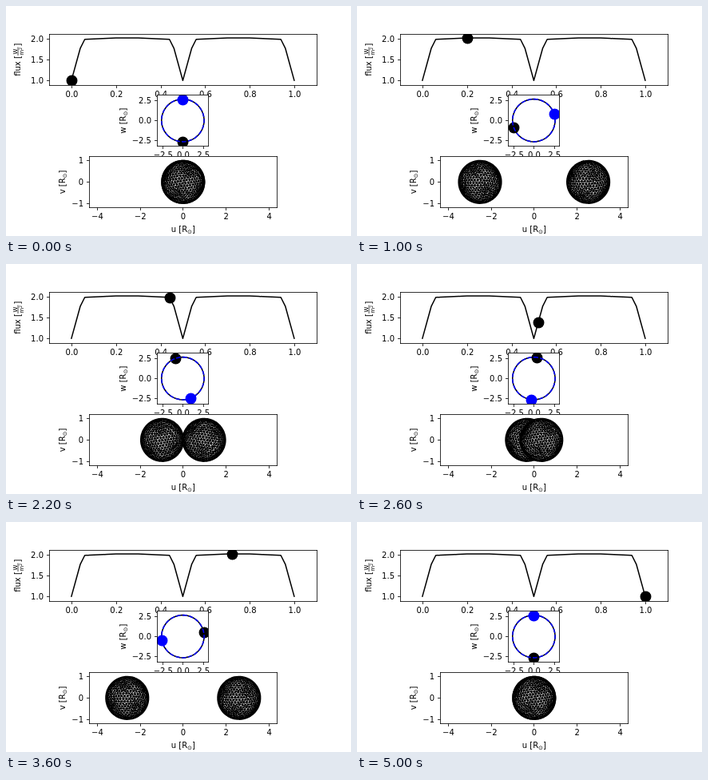
Animation, 432 px wide and 288 px high, one loop 5100 ms. Source, as an HTML page:

```html
<!DOCTYPE html>
<html lang="en">
<head>
<meta charset="utf-8">
<title>Binary star light curve</title>
<style>
  html, body { margin: 0; width: 100%; height: 100%; overflow: hidden; background: #fff; }
  svg { display: block; }
  text { font: 10px "DejaVu Sans", sans-serif; fill: #000; white-space: pre; }
  .s { font-size: 7px; }
  .ss { font-size: 4.9px; }
</style>
</head>
<body>
<svg id="stage" width="432" height="288" viewBox="0 0 432 288"></svg>
<script>
const stage = document.getElementById('stage');
const TAU = Math.PI * 2;
const STEPS = 50, STEP_MS = 100;
const CX = 221.4;
const ORBIT = 2.65;

function add(tag, attrs, parent = stage) {
  const el = document.createElementNS('http://www.w3.org/2000/svg', tag);
  for (const k in attrs) el.setAttribute(k, attrs[k]);
  parent.appendChild(el);
  return el;
}
function label(text, x, y, anchor) {
  add('text', { x, y, 'text-anchor': anchor }).textContent = text;
}
const snap = v => Math.floor(v + 0.5) + 0.5;
const toPath = pts => 'M' + pts.map(p => p[0].toFixed(2) + ' ' + p[1].toFixed(2)).join('L');

// Axes: white background, tick labels, a clipped layer for data, then the frame.
function axes(id, box, xt, yt, px, py, base) {
  const [x0, y0, x1, y1] = box;
  const r = Math.round;
  add('rect', { x: x0, y: y0, width: x1 - x0, height: y1 - y0, fill: '#fff' });
  const clip = add('clipPath', { id });
  add('rect', { x: r(x0), y: r(y0), width: r(x1) - r(x0), height: r(y1) - r(y0) }, clip);
  const [left, top, right, bottom] = box.map(snap);
  let marks = '';
  for (const [v, s] of xt) {
    marks += `M${snap(px(v))} ${bottom}v3.5`;
    label(s, px(v) + 0.6, base, 'middle');
  }
  for (const [v, s] of yt) {
    marks += `M${left} ${snap(py(v))}h-3.5`;
    label(s, r(x0 - 7), r(py(v) + 3.7), 'end');
  }
  const layer = add('g', { 'clip-path': `url(#${id})` });
  const ink = { fill: 'none', stroke: '#000', 'stroke-width': 0.8 };
  add('path', { d: marks, ...ink });
  for (const d of [`M${left} ${top}V${bottom}M${right} ${top}V${bottom}`,
                   `M${left} ${top}H${right}M${left} ${bottom}H${right}`])
    add('path', { d, ...ink, 'stroke-linecap': 'square' });
  return layer;
}
const ticks = (vals, digits) =>
  vals.map(v => [v, (v < 0 ? '\u2212' : '') + Math.abs(v).toFixed(digits)]);

// Light curve
const fluxX = p => 81.9 + 279 * p;
const fluxY = f => 93.18 - 51.74 * (f - 1);
function flux(i) {
  const k = i % 25, edge = Math.min(k, 25 - k);
  if (edge < 3) return [1, 1.39, 1.78][edge];
  return 2.03 - 0.042 * Math.cos(TAU * i / STEPS) ** 2;
}
// Orbit seen from above, and the sky plane
const orbX = u => CX + 10.06 * u;
const orbY = w => 143.27 - 10.06 * w;
const skyX = u => CX + 26.9 * u;
const skyY = v => 220.02 - 26.9 * v;
const place = a => [-ORBIT * Math.sin(a), -ORBIT * Math.cos(a)];

const top1 = axes('c1', [54, 34.56, 388.8, 98.51],
  ticks([0, 0.2, 0.4, 0.6, 0.8, 1], 1), ticks([1, 1.5, 2], 1), fluxX, fluxY, 114);
const mid = axes('c2', [189.42, 111.3, 253.38, 175.25],
  ticks([-2.5, 0, 2.5], 1), ticks([-2.5, 0, 2.5], 1), orbX, orbY, 190);
const sky = axes('c3', [103.9, 188.05, 338.9, 252],
  ticks([-4, -2, 0, 2, 4], 0), ticks([-1, 0, 1], 0), skyX, skyY, 267);

// Axis labels
function radiusLabel(name, x, y, turn) {
  const t = add('text', { transform: `translate(${x} ${y}) rotate(${turn})`, 'text-anchor': 'middle' });
  t.innerHTML = `${name} [R<tspan class="s" dy="1.6">\u2299</tspan><tspan dy="-1.6">]</tspan>`;
}
radiusLabel('u', 221.8, 283, 0);
radiusLabel('w', 150, 143.7, -90);
radiusLabel('v', 74, 220.5, -90);

const unit = add('g', { transform: 'translate(18 67) rotate(-90)' });
function unitText(s, x, y, cls = '') {
  add('text', { x, y, class: cls }, unit).textContent = s;
}
unitText('flux [', -20.8, 0);
unitText('W', 6.6, -4.4, 's');
unitText('m', 5.3, 4.2, 's');
unitText('2', 12.1, 2, 'ss');
unitText(']', 16.4, 0);
add('path', { d: 'M5 -3H15.6', stroke: '#000', 'stroke-width': 0.7 }, unit);

// Curves and markers
const idx = Array.from({ length: STEPS + 1 }, (_, i) => i);
const line = (pts, stroke, parent, more) => add('path', {
  d: toPath(pts), fill: 'none', stroke, 'stroke-width': 1.5, 'stroke-linejoin': 'round', ...more
}, parent);
const ball = (fill, parent) => add('circle', { r: 6.95, fill }, parent);
const ring = sign => idx.map(i => {
  const [u, w] = place(TAU * i / STEPS);
  return [orbX(sign * u), orbY(sign * w)];
});
line(idx.map(i => [fluxX(i / STEPS), fluxY(flux(i))]), '#000', top1, { 'stroke-linecap': 'square' });
const fluxBall = ball('#000', top1);
line(ring(1), '#000', mid);
const ballA = ball('#000', mid);
line(ring(-1), '#00f', mid, { 'stroke-dasharray': '5.55 2.4' });
const ballB = ball('#00f', mid);

function move(el, x, y) {
  el.setAttribute('cx', snap(x));
  el.setAttribute('cy', snap(y));
}

// Geodesic triangle mesh of a unit sphere, slightly uneven
function sphereMesh(n) {
  const g = (1 + Math.sqrt(5)) / 2, verts = [], tris = [];
  for (const a of [-1, 1]) for (const b of [-g, g]) verts.push([0, a, b], [a, b, 0], [b, 0, a]);
  const near = (p, q) => Math.abs(Math.hypot(p[0] - q[0], p[1] - q[1], p[2] - q[2]) - 2) < 0.01;
  const unitVec = p => { const l = Math.hypot(...p); return p.map(c => c / l); };
  const bend = p => {
    const [x, y, z] = unitVec(p);
    const q = unitVec([
      x + 0.016 * Math.sin(31 * y + 17 * z),
      y + 0.016 * Math.sin(29 * z + 19 * x),
      z + 0.016 * Math.sin(37 * x + 13 * y)]);
    const c = Math.cos(0.4), s = Math.sin(0.4);
    return [q[0] * c - q[1] * s, q[0] * s + q[1] * c, q[2]];
  };
  for (let i = 0; i < 12; i++) for (let j = i + 1; j < 12; j++) for (let k = j + 1; k < 12; k++) {
    const [A, B, C] = [verts[i], verts[j], verts[k]];
    if (!near(A, B) || !near(B, C) || !near(A, C)) continue;
    const at = (r, s) => bend(A.map((a, m) => a * (n - r - s) + B[m] * r + C[m] * s));
    for (let r = 0; r < n; r++) for (let s = 0; r + s < n; s++) {
      tris.push([at(r, s), at(r + 1, s), at(r, s + 1)]);
      if (r + s < n - 1) tris.push([at(r + 1, s), at(r + 1, s + 1), at(r, s + 1)]);
    }
  }
  return tris;
}
const mesh = sphereMesh(9);
const RADIUS = 27.1;

function starPath(u, turn) {
  const c = Math.cos(turn), s = Math.sin(turn);
  const cx = skyX(u) + 0.4, cy = skyY(0) + 0.3;
  let d = '';
  for (const t of mesh) {
    let depth = 0;
    const pts = t.map(([x, y, z]) => {
      depth += z * c - x * s;
      return [cx + RADIUS * (x * c + z * s), cy - RADIUS * y];
    });
    if (depth > 0) d += toPath(pts) + 'Z';
  }
  return d;
}
const stars = [0, 1].map(() => add('path', {
  fill: '#fff', stroke: '#000', 'stroke-width': 1.08, 'stroke-linejoin': 'round'
}, sky));

function draw(i) {
  const a = TAU * i / STEPS;
  const [u, w] = place(a);
  move(fluxBall, fluxX(i / STEPS), fluxY(flux(i)));
  move(ballA, orbX(u), orbY(w));
  move(ballB, orbX(-u), orbY(-w));
  const side = w > 0 ? -1 : 1;   // farther star first
  stars[0].setAttribute('d', starPath(side * u, side > 0 ? a : a + Math.PI));
  stars[1].setAttribute('d', starPath(-side * u, side > 0 ? a + Math.PI : a));
}

const start = performance.now();
let last = -1;
function tick() {
  const i = Math.floor((performance.now() - start) / STEP_MS) % (STEPS + 1);
  if (i !== last) draw(last = i);
  requestAnimationFrame(tick);
}
tick();
</script>
</body>
</html>
```
